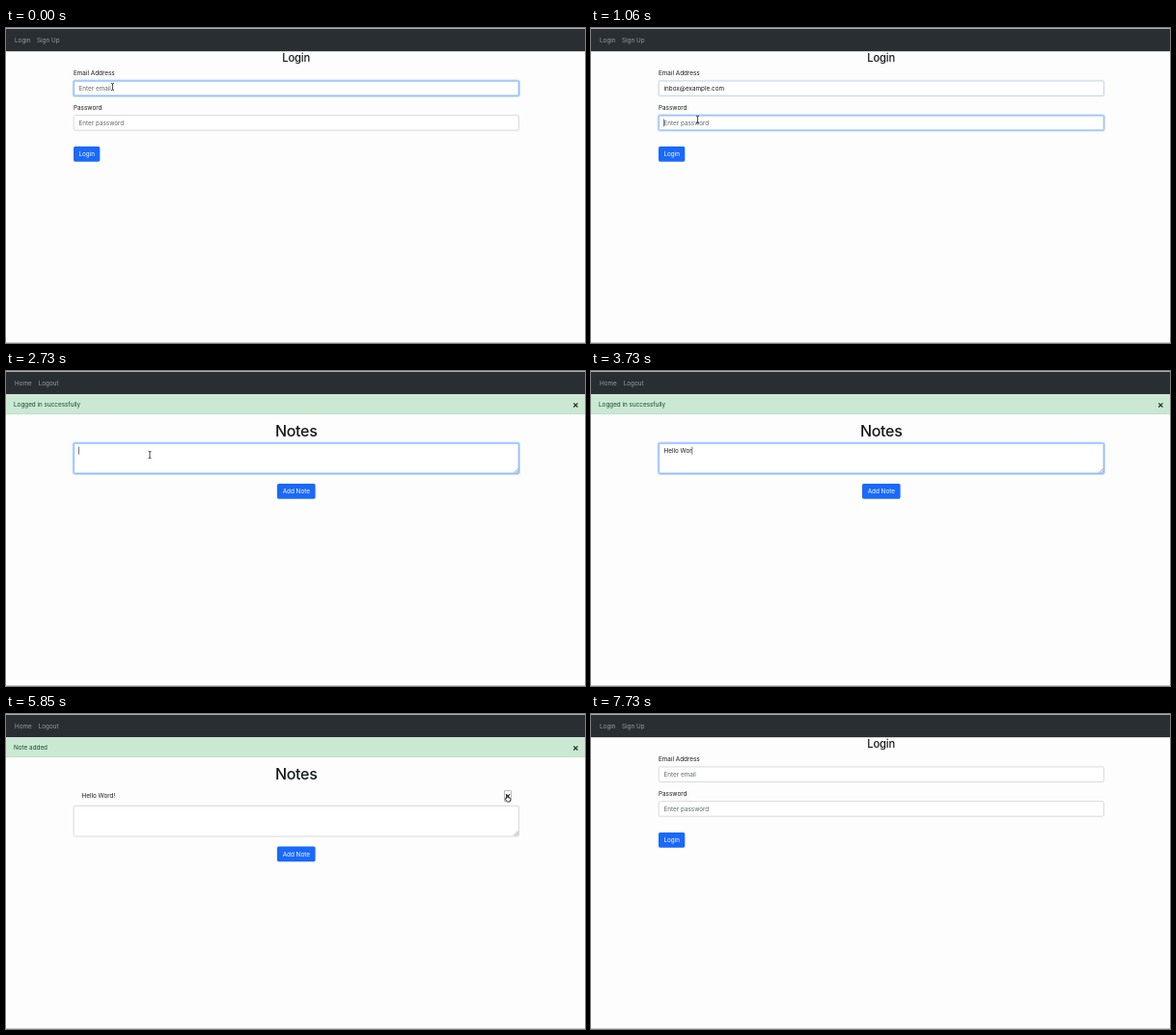
Animation, 600 px wide and 327 px high, one loop 7.85 s. Source, as an HTML page:

```html
<!DOCTYPE html>
<html lang="en">
<head>
<meta charset="utf-8">
<title>Notes app</title>
<style>
  html, body { margin: 0; width: 100%; height: 100%; overflow: hidden; background: #fdfdfd; }
  svg { display: block; width: 100%; height: 100%; }
  text { font: 400 6.35px Inter, "Open Sans", sans-serif; fill: #16191c; white-space: pre; }
  .nav { fill: #9a9da0; }
  .h1 { font-size: 16px; font-weight: 500; letter-spacing: -.02em; text-anchor: middle; }
  .h3 { font-size: 11.2px; font-weight: 500; letter-spacing: -.01em; text-anchor: middle; }
  .hint { fill: #5f666d; }
  .alert { fill: #0f4a2d; }
  .btn { fill: #1a69fa; }
  .btn.hover { fill: #1a5bd0; }
  .label { fill: #fff; text-anchor: middle; }
  .field { fill: #fff; stroke: #cdd1d5; stroke-width: .8; }
  .ring rect { fill: none; stroke: #86b7fe; stroke-width: .8; }
  .ring rect:first-child { stroke: #c2dbfe; stroke-width: 2.6; }
  .cross { fill: none; stroke: #1c2a22; stroke-width: 1.1; }
  .grip { fill: none; stroke: #8a8d90; stroke-width: .6; }
</style>
</head>
<body>
<svg viewBox="0 0 600 327" preserveAspectRatio="none">
  <rect width="600" height="327" fill="#fdfdfd"/>
  <rect width="600" height="1" fill="#cfd2d4"/>
  <rect y=".8" width="600" height="23.4" fill="#292e33"/>
  <rect y="326" width="600" height="1" fill="#cbcbcb"/>

  <g id="login">
    <text class="nav" x="9" y="15">Login</text>
    <text class="nav" id="signup" x="32" y="15">Sign Up</text>
    <text class="h3" x="300.7" y="35.3">Login</text>
    <text x="70" y="48.8">Email Address</text>
    <rect class="field" x="70.2" y="54.9" width="461.3" height="15.5" rx="1.5"/>
    <g class="ring" id="emailRing">
      <rect x="70" y="54.8" width="461.7" height="15.7" rx="1.8"/>
      <rect x="70.2" y="54.9" width="461.3" height="15.5" rx="1.5"/>
    </g>
    <text class="hint" id="emailHint" x="75.5" y="65">Enter email</text>
    <text id="email" x="75.5" y="65">inbox@example.com</text>
    <text x="70" y="84.6">Password</text>
    <rect class="field" x="70.2" y="90.7" width="461.3" height="15.5" rx="1.5"/>
    <g class="ring" id="passRing">
      <rect x="70" y="90.6" width="461.7" height="15.7" rx="1.8"/>
      <rect x="70.2" y="90.7" width="461.3" height="15.5" rx="1.5"/>
    </g>
    <text class="hint" id="passHint" x="75.5" y="100.8">Enter password</text>
    <g id="dots" fill="#16191c"></g>
    <rect class="btn" id="loginBtn" x="70" y="123" width="27.3" height="15.7" rx="1.6"/>
    <text class="label" x="83.7" y="133.2">Login</text>
  </g>

  <g id="notes">
    <text class="nav" x="9" y="15">Home</text>
    <text class="nav" id="logout" x="33.7" y="15">Logout</text>
    <g id="alert">
      <rect y="24.2" width="600" height="20.8" fill="#cbe8d3"/>
      <rect y="44.4" width="600" height=".6" fill="#badbc6"/>
      <text class="alert" id="message" x="8" y="37.2"></text>
      <path class="cross" d="M588.2 33.3l4.2 4.2m0-4.2l-4.2 4.2"/>
    </g>
    <g id="body">
      <text class="h1" x="300.7" y="68">Notes</text>
      <g id="row">
        <text x="78.5" y="87.4">Hello Word!</text>
        <rect id="outline" x="516.5" y="79.8" width="7" height="10.4" fill="none" stroke="#8f8f8f" stroke-width=".6"/>
        <path class="cross" d="M517.9 83.3l4.2 4.2m0-4.2l-4.2 4.2"/>
      </g>
      <g id="form">
        <rect class="field" x="70.2" y="74.9" width="461.3" height="31.6" rx="1.5"/>
        <g class="ring" id="noteRing">
          <rect x="70" y="74.8" width="461.7" height="31.8" rx="1.8"/>
          <rect x="70.2" y="74.9" width="461.3" height="31.6" rx="1.5"/>
        </g>
        <path class="grip" d="M526 105.8l5-5m-3.4 5l3.4-3.4m-1.8 3.4l1.8-1.8"/>
        <text id="note" x="75.5" y="85.2"></text>
        <rect class="btn" id="addBtn" x="281" y="117" width="39.6" height="15.7" rx="1.6"/>
        <text class="label" x="300.8" y="127.2">Add Note</text>
      </g>
    </g>
  </g>

  <rect id="caret" width=".6" height="8" fill="#222"/>

  <g id="mouse">
    <path id="beam" d="M-1.5-3.7Q0-3.7 0-2.7Q0-3.7 1.5-3.7M0-2.9V2.9M-1.5 3.7Q0 3.7 0 2.7Q0 3.7 1.5 3.7" fill="none" stroke="#222" stroke-width=".8"/>
    <path id="arrow" d="M0 0V6L1.4 4.8L2.4 7L3.4 6.6L2.5 4.4H4.3Z" fill="#000" stroke="#fff" stroke-width=".4"/>
    <path id="hand" d="M-1.4-3.4Q-.8-4-.3-3.3V-1L2-.4Q2.9-.1 2.8.8L2.2 3.6H-.9L-2.8.6Q-2.7-.4-1.4.4Z" fill="#fff" stroke="#111" stroke-width=".8"/>
  </g>
</svg>
<script>
const LOOP = 7850;
const $ = id => document.getElementById(id);
const show = (id, on) => { $(id).style.display = on ? '' : 'none'; };
const clamp = v => Math.min(1, Math.max(0, v));
const within = (t, a, b) => t >= a && t < b;
const fade = (id, v) => { $(id).style.opacity = v; };
const shift = (id, x, y) => $(id).setAttribute('transform', `translate(${x} ${y})`);

const TIMES = { signedIn: 2240, added: 4870, deleted: 5940, signedOut: 6940 };
const PASS_KEYS = [1210, 1450, 1540, 1760, 1820];
const NOTE = 'Hello Word!';
const NOTE_KEYS = [3060, 3140, 3220, 3280, 3450, 3510, 3565, 3620, 3700, 3780, 3970];

// start, end, from x, from y, to x, to y
const MOVES = [
  [420, 900, 110.5, 61, 110.5, 95],
  [1850, 1970, 110.5, 95, 96.5, 121.5],
  [1970, 2080, 96.5, 121.5, 86, 131],
  [2520, 2660, 86, 131, 149, 87],
  [4240, 4610, 149, 87, 297, 129],
  [5270, 5800, 297, 129, 520, 87.5],
  [6180, 6750, 520, 87.5, 44, 13],
  [7150, 7420, 44, 13, 88, 57]
];
const HIDDEN = [[150, 420], [1210, 1850], [3060, 4240], [7730, LOOP]];

for (let i = 0; i < PASS_KEYS.length; i++) {
  const dot = document.createElementNS('http://www.w3.org/2000/svg', 'circle');
  dot.setAttribute('cx', 77 + i * 3.1);
  dot.setAttribute('cy', 98.8);
  dot.setAttribute('r', .85);
  $('dots').append(dot);
}

function pointer(t) {
  let [x, y] = [110.5, 61];
  for (const [a, b, x0, y0, x1, y1] of MOVES) {
    if (t < a) break;
    const p = clamp((t - a) / (b - a)), e = p * p * (3 - 2 * p);
    x = x0 + (x1 - x0) * e;
    y = y0 + (y1 - y0) * e;
  }
  return { x, y };
}

function drawCaret(t, focus, keys, x, y) {
  const last = keys.filter(k => k <= t).pop() ?? focus;
  show('caret', (t - last) % 1000 < 500);
  $('caret').setAttribute('x', x);
  $('caret').setAttribute('y', y);
}

function draw(t) {
  const onNotes = within(t, TIMES.signedIn, TIMES.signedOut);
  const hasAlert = t < TIMES.deleted;
  const hasRow = within(t, TIMES.added, TIMES.deleted);
  const { x, y } = pointer(t);
  const over = (x0, y0, x1, y1) => x >= x0 && x <= x1 && y >= y0 && y <= y1;
  show('login', !onNotes);
  show('notes', onNotes);
  show('caret', false);
  let shape = 'arrow';

  if (onNotes) {
    const lift = hasAlert ? 0 : -20.5, drop = hasRow ? 20.5 : 0, dy = lift + drop;
    show('alert', hasAlert);
    $('message').textContent = t < TIMES.added ? 'Logged in successfully' : 'Note added';
    shift('body', 0, lift);
    shift('form', 0, drop);
    show('row', hasRow);
    show('outline', t >= 5820);
    const typed = t < TIMES.added ? NOTE_KEYS.filter(k => k <= t).length : 0;
    $('note').textContent = NOTE.slice(0, typed);
    fade('noteRing', t < TIMES.added ? clamp((t - 2590) / 140) : 0);
    if (within(t, 2590, TIMES.added)) {
      const width = typed ? $('note').getComputedTextLength() : 0;
      drawCaret(t, 2590, NOTE_KEYS, 75.4 + width, 78.6);
    }
    const onAdd = over(281, 117 + dy, 320.6, 132.7 + dy);
    const onLogout = over(32, 6, 57, 20);
    $('addBtn').classList.toggle('hover', onAdd);
    $('logout').style.fill = onLogout ? '#c4c6c8' : '';
    if (over(70, 75 + dy, 531, 107 + dy)) shape = 'beam';
    if (onAdd || onLogout || hasRow && over(516, 79, 524, 91)) shape = 'hand';
  } else {
    const filled = within(t, 150, TIMES.signedIn);
    const first = t < TIMES.signedIn;
    const typed = first ? PASS_KEYS.filter(k => k <= t).length : 0;
    const swap = clamp((t - 960) / 120);
    show('email', filled);
    show('emailHint', !filled);
    show('passHint', !typed);
    [...$('dots').children].forEach((d, i) => { d.style.display = i < typed ? '' : 'none'; });
    fade('emailRing', first ? 1 - swap : 0);
    fade('passRing', first ? swap : 0);
    if (within(t, 150, 960)) drawCaret(t, 150, [], 75.6 + $('email').getComputedTextLength(), 58.6);
    if (within(t, 960, TIMES.signedIn)) drawCaret(t, 960, PASS_KEYS, 75.4 + typed * 3.1, 94.4);
    const onLogin = over(70, 123, 97.3, 138.7);
    const onSignup = over(31, 6, 57, 20);
    $('loginBtn').classList.toggle('hover', onLogin);
    $('signup').style.fill = onSignup ? '#c4c6c8' : '';
    if (over(70, 55, 531, 71) || over(70, 91, 531, 107)) shape = 'beam';
    if (onLogin || onSignup) shape = 'hand';
  }

  for (const id of ['beam', 'arrow', 'hand']) show(id, id === shape);
  show('mouse', !HIDDEN.some(([a, b]) => within(t, a, b)));
  fade('mouse', 1 - clamp((t - 7580) / 150));
  shift('mouse', x, y);
}

function tick() {
  draw(performance.now() % LOOP);
  requestAnimationFrame(tick);
}
tick();
</script>
</body>
</html>
```
